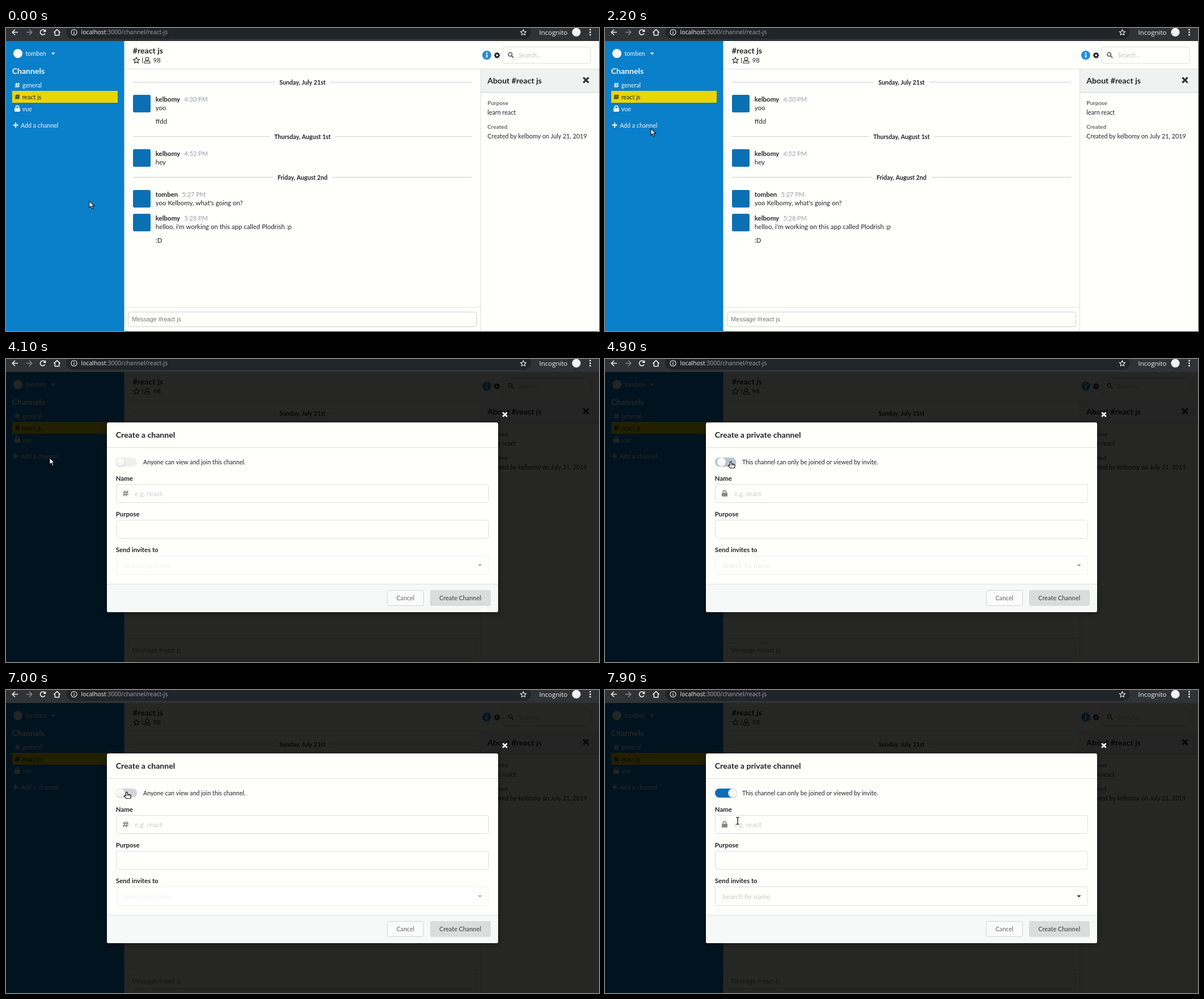
Recreate the animation shown at these times as an HTML page with a canvas. Size 1046 by 535 pixels, loop 8000 ms.

```html
<!DOCTYPE html>
<html lang="en">
<head>
<meta charset="utf-8">
<title>Create a channel</title>
<style>
html, body { margin: 0; width: 100%; height: 100%; overflow: hidden; background: #fffffc; }
canvas { display: block; width: 1046px; height: 535px; }
</style>
</head>
<body>
<canvas id="stage" width="1046" height="535"></canvas>
<script>
const g = document.getElementById('stage').getContext('2d');
const LOOP = 8000, STEP = 100;
const WHITE = '#fffffc', INK = '#222322', RULE = '#dededc';
const LATO = 'Lato, sans-serif', ARIAL = '"Liberation Sans", Arial, sans-serif', UI = '"Open Sans", sans-serif';
const USER = 'tomben', FRIEND = 'kelbomy';

// start, x, y, shape: the pointer holds each place until the next
const POINTER = [
  [0, 147, 305, 'arrow'], [1300, 136, 276, 'arrow'], [1400, 114, 231, 'arrow'],
  [1600, 97, 197, 'arrow'], [1700, 90, 185, 'arrow'], [1900, 85, 179, 'arrow'],
  [2200, 81, 177, 'arrow'], [2300, 79, 176, 'arrow'], [2500, 75, 174, 'arrow'],
  [3100, 77, 174, 'arrow'], [4300, 95, 176, 'arrow'], [4400, 130, 180, 'arrow'],
  [4500, 165, 183, 'arrow'], [4600, 203, 183, 'hand'], [4700, 222, 181, 'hand'],
  [5700, 214, 179, 'hand'], [5800, 207, 179, 'hand'], [5900, 205, 179, 'hand'],
  [7000, 213, 180, 'hand'], [7500, 216, 184, 'hand'], [7600, 223, 200, 'arrow'],
  [7700, 230, 220, 'beam'], [7800, 234, 229, 'beam'], [7900, 234, 231, 'beam']
];
// start, duration, private?
const FLIPS = [[4900, 400, 1], [6200, 300, 0], [7100, 400, 1]];
const MODAL_AT = 4100;

function text(s, x, y, size, color = INK, weight = 400, family = LATO, align = 'left') {
  g.font = `${weight} ${size}px ${family}`;
  g.textAlign = align;
  g.fillStyle = color;
  g.fillText(s, x, y);
  return g.measureText(s).width;
}
const bold = (s, x, y, size, color) => text(s, x, y, size, color, 700);

function box(x, y, w, h, color) {
  g.fillStyle = color;
  g.fillRect(x, y, w, h);
}
function round(x, y, w, h, r, fill, stroke) {
  g.beginPath();
  g.roundRect(x, y, w, h, r);
  if (fill) { g.fillStyle = fill; g.fill(); }
  if (stroke) { g.lineWidth = 1; g.strokeStyle = stroke; g.stroke(); }
}
function disc(x, y, r, color) {
  g.beginPath();
  g.arc(x, y, r, 0, 7);
  g.fillStyle = color;
  g.fill();
}
function ring(x, y, r, color, w, from = 0, to = Math.PI * 2) {
  g.beginPath();
  g.arc(x, y, r, from, to);
  g.strokeStyle = color;
  g.lineWidth = w;
  g.stroke();
}
function trace(points, closed) {
  g.beginPath();
  for (let i = 0; i < points.length; i += 2) g.lineTo(points[i], points[i + 1]);
  if (closed) g.closePath();
}
function stroke(color, w, ...points) {
  trace(points);
  g.strokeStyle = color;
  g.lineWidth = w;
  g.stroke();
}
function poly(color, ...points) {
  trace(points, true);
  g.fillStyle = color;
  g.fill();
}

// icons
function hash(x, y, s, color) {
  const w = s * 0.17;
  for (const d of [-0.2, 0.2]) {
    stroke(color, w, x + s * (d + 0.1), y - s / 2, x + s * (d - 0.1), y + s / 2);
    stroke(color, w, x - s / 2, y + s * d, x + s / 2, y + s * d);
  }
}
function lock(x, y, color) {
  round(x - 5, y - 1, 10, 6.5, 1, color);
  ring(x, y - 2.2, 2.7, color, 1.6, Math.PI, 0);
  box(x - 3.5, y - 2.3, 1.6, 2, color);
  box(x + 1.9, y - 2.3, 1.6, 2, color);
}
function cross(x, y, r, w, color) {
  stroke(color, w, x - r, y - r, x + r, y + r);
  stroke(color, w, x - r, y + r, x + r, y - r);
}
function star(x, y, r, color, w) {
  const p = [];
  for (let i = 0; i < 10; i++) {
    const a = i * Math.PI / 5 - Math.PI / 2, d = i % 2 ? r * 0.48 : r;
    p.push(x + d * Math.cos(a), y + d * Math.sin(a));
  }
  trace(p, true);
  g.strokeStyle = color;
  g.lineWidth = w;
  g.stroke();
}
function gear(x, y) {
  ring(x, y, 3, INK, 2.4);
  for (let i = 0; i < 8; i++) {
    const c = Math.cos(i * Math.PI / 4), s = Math.sin(i * Math.PI / 4);
    stroke(INK, 2, x + 3.5 * c, y + 3.5 * s, x + 5.4 * c, y + 5.4 * s);
  }
}
const caret = (x, y, r, color) => poly(color, x - r, y - r / 2, x + r, y - r / 2, x, y + r * 0.55);

function browserBar() {
  const fg = '#f1f3f4', dim = '#84888c';
  box(0, 0, 1046, 23, '#303336');
  round(106, -5, 820, 24, 12, '#222528');
  for (const [x, d, c] of [[16, -1, fg], [41, 1, dim]]) {
    stroke(c, 1.5, x - 5 * d, 7.5, x + 5 * d, 7.5);
    stroke(c, 1.5, x, 2.7, x + 4.8 * d, 7.5, x, 12.3);
  }
  ring(65, 7.5, 4.5, fg, 1.6, 0.5, 5.5);
  poly(fg, 70.3, 2, 70.3, 7, 65.3, 7);
  stroke(fg, 1.5, 84.3, 8, 90, 2.6, 95.7, 8);
  stroke(fg, 1.5, 86.3, 7, 86.3, 12.7, 93.7, 12.7, 93.7, 7);
  ring(120, 7.5, 5, fg, 1.1);
  box(119.4, 6.8, 1.3, 3.7, fg);
  box(119.4, 4.5, 1.3, 1.3, fg);
  const w = text('localhost', 132.5, 11.3, 10.5, fg, 400, UI);
  text(':3000/channel/react-js', 132.5 + w, 11.3, 10.5, '#a0a5a9', 400, UI);
  star(912.5, 8, 5.3, fg, 1.1);
  text('Incognito', 940.5, 11.5, 11.5, fg, 400, UI);
  disc(1006, 7.5, 7.6, '#f1f3f4');
  for (const y of [3, 7.5, 12]) disc(1030.5, y, 1.4, fg);
}

function sidebar() {
  const fg = '#f4f9fb';
  box(0, 23, 208.5, 512, '#0a7fca');
  disc(21, 45, 8, fg);
  text(USER, 34.5, 48.5, 10.7, fg);
  caret(83.2, 45.3, 3.4, fg);
  bold('Channels', 10.7, 81, 14.1, fg);
  hash(20, 101, 8.5, fg);
  text('general', 28.7, 105, 10.7, fg);
  box(11, 111, 186, 21, '#ead506');
  hash(20, 121.7, 8.5, INK);
  text('react js', 28.7, 125.7, 10.7, INK);
  lock(20, 142.3, fg);
  text('vue', 28.7, 146.5, 10.7, fg);
  stroke(fg, 2.2, 12.5, 171.5, 21.5, 171.5);
  stroke(fg, 2.2, 17, 167, 17, 176);
  text('Add a channel', 26, 175.7, 10.7, fg);
}

function header() {
  bold('#react js', 223.8, 45.3, 14.1);
  star(230, 57.3, 5.6, INK, 1.1);
  box(240.3, 52, 1, 10, INK);
  ring(249, 54.6, 2.9, INK, 1.1);
  g.beginPath();
  g.moveTo(244, 62);
  g.bezierCurveTo(243.5, 56.5, 247, 58.5, 249, 58.5);
  g.bezierCurveTo(251, 58.5, 254.5, 56.5, 254, 62);
  g.closePath();
  g.stroke();
  text('98', 259.8, 61, 11.3);
  box(209, 72, 837, 1, RULE);
  disc(848, 48, 8, '#2b8cd4');
  box(846.9, 46.8, 2.3, 5.4, WHITE);
  box(846.9, 43.2, 2.3, 2.3, WHITE);
  gear(866.2, 48.2);
  round(876.5, 33.5, 155, 29, 3.5, WHITE, RULE);
  ring(889.3, 46.6, 3.3, '#666', 1.7);
  stroke('#666', 2, 891.7, 49, 895.3, 52.6);
  text('Search...', 904.5, 51.8, 10.7, '#c2c2c0');
}

function divider(label, y) {
  const half = text(label, 523, y + 4, 10.65, INK, 700, LATO, 'center') / 2 + 8;
  box(224, y - 0.5, 299 - half, 1, '#cfcfcd');
  box(523 + half, y - 0.5, 299 - half, 1, '#cfcfcd');
}
function message(y, author, time, first, second) {
  round(224, y, 31, 31, 2.5, '#0a70b3');
  const w = bold(author, 263.8, y + 11.7, 11.45);
  text(time, 263.8 + w + 7.3, y + 11.7, 11, '#98a1aa');
  text(first, 263.8, y + 27, 11.45);
  if (second) text(second, 263.8, y + 50.5, 11.45);
}
function chat() {
  divider('Sunday, July 21st', 95.5);
  message(118, FRIEND, '4:30 PM', 'yoo', 'ffdd');
  divider('Thursday, August 1st', 191.5);
  message(214, FRIEND, '4:52 PM', 'hey');
  divider('Friday, August 2nd', 263.5);
  message(286, USER, '5:27 PM', "yoo Kelbomy, what's going on?");
  message(328, FRIEND, '5:28 PM', "helloo, i'm working on this app called Plodrish :p", ':D');
  box(209, 493, 628, 1, RULE);
  round(215.5, 501.5, 615, 26, 4, WHITE, '#cfcfcd');
  text('Message #react js', 222.3, 518.2, 10.7, '#777775', 400, ARIAL);
}

function about() {
  box(838, 73, 208, 41, '#f0f1f1');
  box(838, 113.5, 208, 1, '#d2d3d3');
  box(837, 72, 1, 463, RULE);
  bold('About #react js', 849.3, 98, 14.1);
  cross(1023, 92, 4.6, 3.2, '#333433');
  bold('Purpose', 849.3, 135.8, 9.95, '#666765');
  text('learn react', 849.3, 153.3, 10.75);
  bold('Created', 849.3, 177.8, 9.95, '#666765');
  text(`Created by ${FRIEND} on July 21, 2019`, 849.3, 195.3, 10.75);
}

function toggle(p, focus) {
  const off = focus ? 212 : 239;
  const mix = b => Math.round(off + (b - off) * p);
  round(194, 174, 37.2, 16, 8, `rgb(${mix(14)},${mix(109)},${mix(181)})`);
  const x = 201.8 + 23.3 * p;
  disc(x, 182.6, 8.2, 'rgba(34,36,38,.16)');
  disc(x, 182, 8, '#d9dad9');
  const shade = g.createLinearGradient(0, 174, 0, 190);
  shade.addColorStop(0, WHITE);
  shade.addColorStop(1, '#f1f2f1');
  disc(x, 182, 7.3, shade);
}

function modal(p, locked, focus) {
  box(0, 23, 1046, 512, 'rgba(0,0,0,.85)');
  cross(880, 98, 3.8, 2.8, '#f2f2ef');
  g.shadowColor = 'rgba(0,0,0,.4)';
  g.shadowBlur = 10;
  g.shadowOffsetY = 2;
  round(178, 112, 690, 335, 3, WHITE);
  g.shadowColor = 'transparent';
  round(178, 397, 690, 50, [0, 0, 3, 3], '#f7f9f8');
  box(178, 156, 690, 1, RULE);
  box(178, 397, 690, 1, RULE);
  bold(locked ? 'Create a private channel' : 'Create a channel', 193.8, 139.2, 14.1);

  toggle(p, focus);
  text(locked ? 'This channel can only be joined or viewed by invite.'
    : 'Anyone can view and join this channel.', 242, 186, 10.65);

  bold('Name', 193.8, 214.5, 11.4);
  round(194.5, 221.5, 657, 32, 3.5, WHITE, RULE);
  if (locked) lock(211, 237.3, '#858583');
  else hash(211, 237.3, 10, '#858583');
  text('e.g. react', 227.2, 242, 12.25, '#cbcbc9');

  bold('Purpose', 193.8, 278, 11.4);
  round(194.5, 284.5, 657, 32, 3.5, WHITE, RULE);

  bold('Send invites to', 193.8, 341, 11.4);
  g.globalAlpha = 0.4 + 0.6 * p;
  round(194.5, 347.5, 657, 33, 3.5, WHITE, RULE);
  caret(836, 364.3, 3.7, '#333');
  g.globalAlpha = 0.28 + 0.72 * p;
  text('Search by name', 206.8, 368.7, 12.25, '#c8c8c6');
  g.globalAlpha = 1;

  round(672.5, 408.5, 64, 27, 3, '#fafbfa', '#d3d5d4');
  text('Cancel', 704.5, 426.2, 10.7, '#636463', 400, LATO, 'center');
  round(748, 408, 107, 28, 3, '#dbdddc');
  text('Create Channel', 801.2, 426.2, 10.8, '#626362', 700, LATO, 'center');
}

const SHAPES = {
  arrow() {
    trace([0, 0.5, 0, 12.2, 2.8, 9.7, 4.9, 14.4, 6.8, 13.5, 4.8, 9, 8.6, 9], true);
    g.lineWidth = 1.1;
    g.strokeStyle = '#111';
    g.fillStyle = '#fff';
    g.fill();
    g.stroke();
  },
  hand() {
    g.beginPath();
    g.moveTo(-1.5, 7);
    g.lineTo(-1.5, 1.2);
    g.quadraticCurveTo(0, -0.8, 1.3, 1.2);
    g.lineTo(1.3, 4.2);
    g.lineTo(6, 5);
    g.quadraticCurveTo(7.7, 5.4, 7.5, 7.2);
    g.lineTo(6.3, 11.5);
    g.lineTo(-1, 11.5);
    g.lineTo(-4.8, 7.2);
    g.quadraticCurveTo(-4, 5.4, -1.5, 7);
    g.closePath();
    g.lineWidth = 1.2;
    g.strokeStyle = '#111';
    g.fillStyle = '#fff';
    g.fill();
    g.stroke();
    for (const x of [1.4, 3.4, 5.3]) stroke('#111', 0.8, x, 4.5, x, 7.2);
  },
  beam() {
    for (const [color, w] of [['#fff', 3], ['#111', 1.3]]) {
      stroke(color, w, 0, -5.5, 0, 5.5);
      stroke(color, w, -2.6, -6, 2.6, -6);
      stroke(color, w, -2.6, 6, 2.6, 6);
    }
  }
};

const current = (list, t) => list.filter(k => k[0] <= t).pop();

function draw(t) {
  box(0, 0, 1046, 535, WHITE);
  sidebar();
  header();
  chat();
  about();
  const [, x, y, shape] = current(POINTER, t);
  if (t >= MODAL_AT) {
    const flip = current(FLIPS, t);
    let p = 0;
    if (flip) {
      const u = Math.min(1, (t - flip[0] + STEP) / flip[1]);
      const eased = u * u * (3 - 2 * u);
      p = flip[2] ? eased : 1 - eased;
    }
    modal(p, flip && flip[2], flip || shape === 'hand');
  }
  browserBar();
  g.save();
  g.translate(x, y);
  SHAPES[shape]();
  g.restore();
}

function tick() {
  const t = performance.now() % LOOP;
  draw(Math.floor(t / STEP) * STEP);
  requestAnimationFrame(tick);
}
tick();
</script>
</body>
</html>
```
